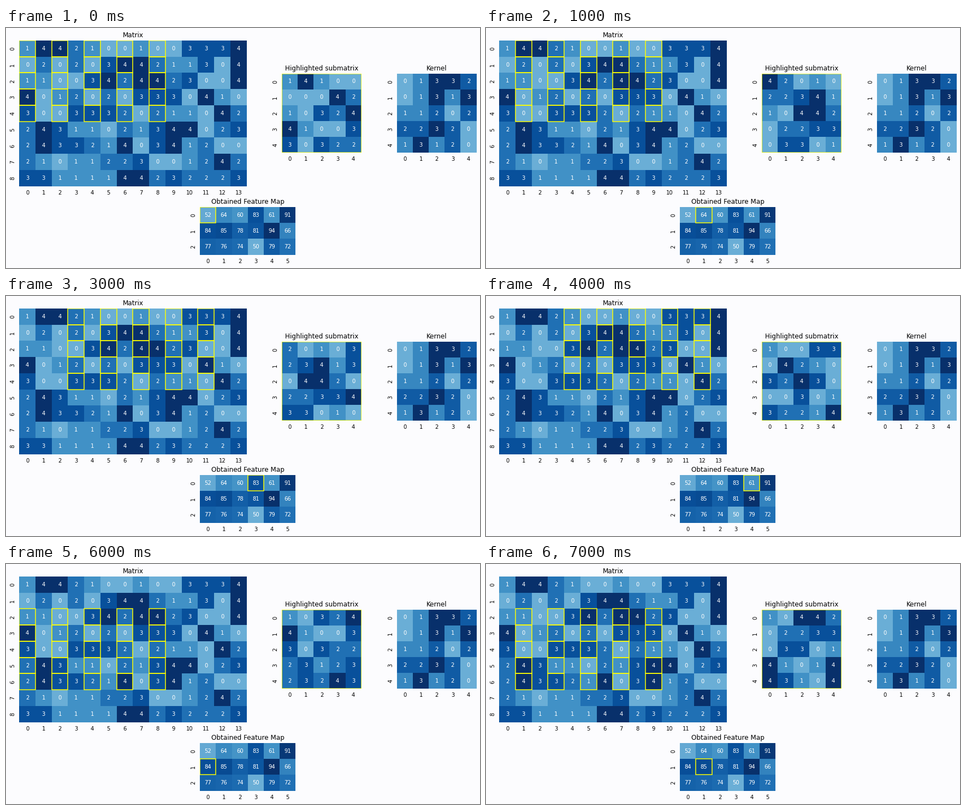
Recreate the animation shown at these times as a matplotlib script. Size 868 px wide and 441 px high, loop 8000 ms.

```python
import numpy as np
import matplotlib.pyplot as plt
from matplotlib.animation import FuncAnimation
from matplotlib.patches import Rectangle

W, H, DPI = 868, 441, 72
STRIDE = (2, 1)
DILATION = (1, 2)
STEPS = 8

plt.rcParams["font.family"] = "DejaVu Sans"


def grid(rows):
    return np.array([[int(ch) for ch in row] for row in rows.split()])


# The two inputs; every other value is computed from them.
matrix = grid("""
    14421001003334
    02020344211304
    11003424423004
    40120203330410
    30033320211042
    24311021344023
    24332140341200
    21011223001242
    33111144232223
""")
kernel = grid("01332 01313 11202 22320 13120")
K = len(kernel)


def window(row, col):
    """Row and column indices covered by the kernel at one output cell."""
    rows = row * STRIDE[0] + DILATION[0] * np.arange(K)
    cols = col * STRIDE[1] + DILATION[1] * np.arange(K)
    return rows, cols


def patch(row, col):
    return matrix[np.ix_(*window(row, col))]


n_rows, n_cols = [
    (size - dilation * (K - 1) - 1) // stride + 1
    for size, dilation, stride in zip(matrix.shape, DILATION, STRIDE)
]
feature = np.array([[(patch(r, c) * kernel).sum() for c in range(n_cols)]
                    for r in range(n_rows)])

fig = plt.figure(figsize=((W + 0.01) / DPI, (H + 0.01) / DPI), dpi=DPI,
                 facecolor="#fcfcfe")


def heatmap(data, title, x, y, cell):
    """Annotated heatmap of square cells; x, y is its top left in pixels."""
    rows, cols = data.shape
    w, h = cols * cell, rows * cell
    ax = fig.add_axes([x / W, 1 - (y + h) / H, w / W, h / H])
    # The lowest value sits in the middle of the colour scale.
    low, high = data.min(), data.max()
    mesh = ax.pcolormesh(data, cmap="Blues", vmin=2 * low - high, vmax=high)
    ax.set(xlim=(0, cols), ylim=(rows, 0))
    ax.set_xticks(np.arange(cols) + 0.5, range(cols))
    ax.set_yticks(np.arange(rows) + 0.5, range(rows),
                  rotation="vertical", va="center")
    ax.tick_params(length=0, pad=7, labelsize=10)
    ax.spines[:].set_visible(False)
    ax.set_title(title, fontsize=12, pad=6)
    labels = [ax.text(c + 0.5, r + 0.5, value, color="white", fontsize=10,
                      ha="center", va="center")
              for (r, c), value in np.ndenumerate(data)]
    return ax, mesh, labels


def frame(ax, size=1):
    return ax.add_patch(Rectangle((0, 0), size, size, fill=False,
                                  edgecolor="yellow", lw=1.5))


main_ax, _, _ = heatmap(matrix, "Matrix", 24.2, 23, 29.75)
sub_ax, sub_mesh, sub_labels = heatmap(
    patch(0, 0), "Highlighted submatrix", 505.3, 83.9, 29.06)
heatmap(kernel, "Kernel", 716.2, 83.9, 29.06)
map_ax, _, _ = heatmap(feature, "Obtained Feature Map", 355.2, 329.1, 29.2)

cells = [frame(main_ax) for _ in range(K * K)]
frame(sub_ax, K)
marker = frame(map_ax)


def update(step):
    row, col = divmod(step, n_cols)
    rows, cols = window(row, col)
    for i, cell in enumerate(cells):
        cell.set_xy((cols[i % K], rows[i // K]))
    values = patch(row, col)
    sub_mesh.set_array(values)
    for label, value in zip(sub_labels, values.flat):
        label.set_text(str(value))
    marker.set_xy((col, row))
    return []


anim = FuncAnimation(fig, update, frames=STEPS, interval=1000,
                     init_func=lambda: update(0), repeat=True, repeat_delay=0)
plt.show()
```
